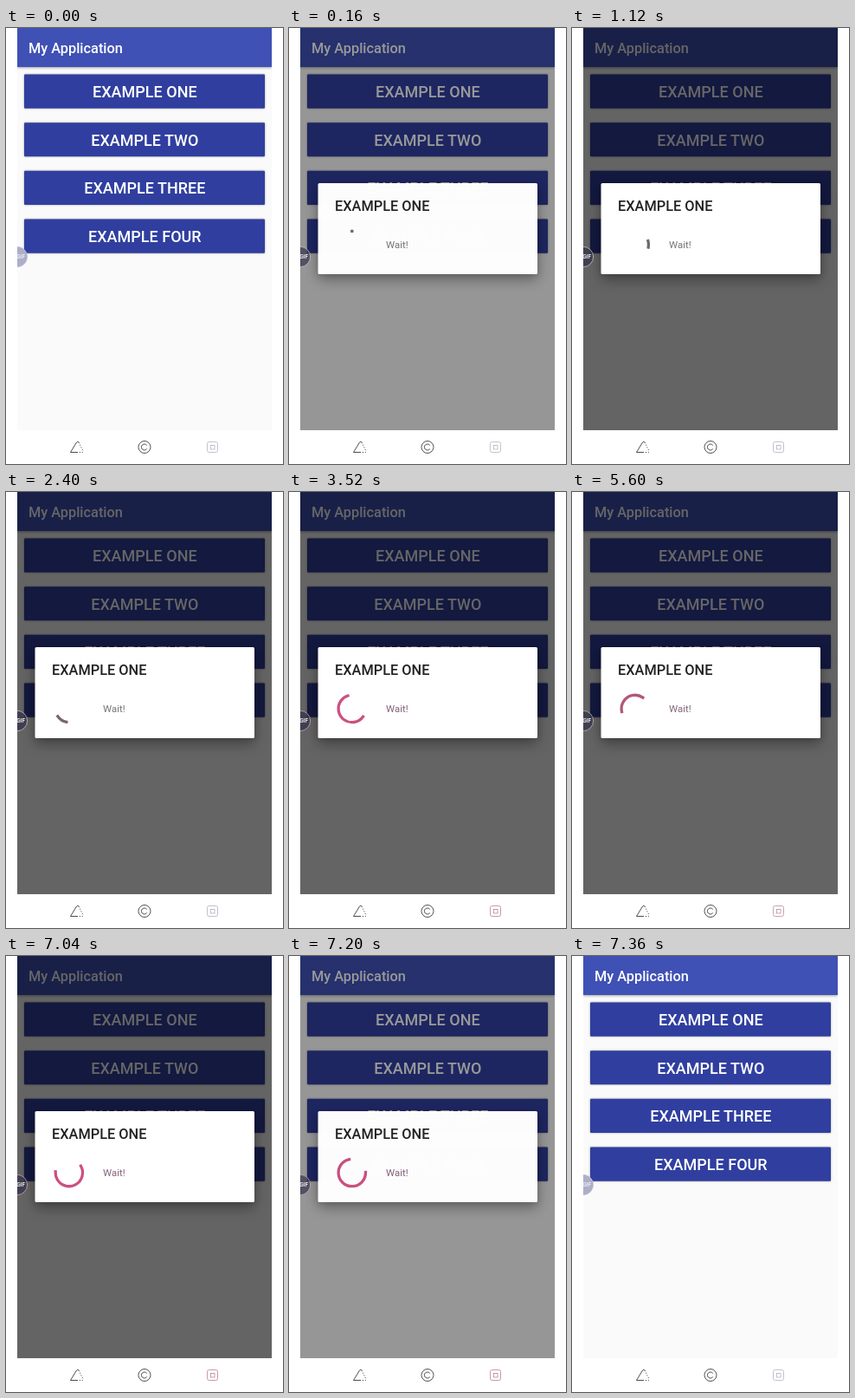
These frames come from a looping animation (320 by 503 pixels, 9.6 s). An HTML page:

```html
<!DOCTYPE html>
<html lang="en">
<head>
<meta charset="utf-8">
<title>Progress dialog</title>
<style>
  html, body { margin: 0; width: 100%; height: 100%; overflow: hidden; background: #fff; }
  svg { display: block; width: 100%; height: 100%; font-family: Roboto, sans-serif; --tint: 0%; }
  .medium { font-weight: 500; }
  .bar { fill: #3f51b5; filter: drop-shadow(0 1px 1.5px rgba(0,0,0,.35)); }
  .button rect { fill: #303f9f; filter: drop-shadow(0 .8px .9px rgba(0,0,0,.38)); }
  .button text { fill: #fff; font-size: 18px; text-anchor: middle; }
  .heading { font-size: 16.33px; }
  .card { fill: #fff; filter: drop-shadow(0 6px 8px rgba(0,0,0,.32)) drop-shadow(0 1px 3px rgba(0,0,0,.15)); }
  .wait { font-size: 11.43px; fill: color-mix(in srgb, #86607a var(--tint), #757575); }
  .spinner { fill: none; stroke-width: 3.3; stroke-linecap: square;
    stroke: color-mix(in srgb, #cc5080 var(--tint), #6a6a6a); }
  .bubble circle { fill: #adaec8; stroke: #c3c4d8; stroke-width: .8; }
  .bubble text { fill: #f4f4fa; font-size: 6.5px; font-weight: 500; }
  .open .bubble circle { fill: rgba(45,45,70,.65); stroke: color-mix(in srgb, #d3a5b5 var(--tint), #c6c6c6); }
  .open .bubble text { fill: #fff; }
  .nav { fill: none; stroke: #222; stroke-width: .8; }
  .nav .recent { stroke: color-mix(in srgb, #bd7f96 var(--tint), #b4b4c4); }
</style>
</head>
<body>
<svg id="stage" viewBox="0 0 320 503">
  <clipPath id="screen"><rect x="13" width="294" height="464"/></clipPath>
  <g clip-path="url(#screen)">
    <rect x="13" width="294" height="464" fill="#fafafa"/>
    <rect class="bar" x="13" y="-5" width="294" height="50"/>
    <text class="heading medium" x="26" y="28.6" fill="#fff">My Application</text>
    <g id="buttons"></g>
    <rect id="dim" x="13" width="294" height="464" opacity="0"/>
    <g id="dialog">
      <rect class="card" x="33.5" y="179" width="253.5" height="105" rx="1.6"/>
      <text class="heading medium" x="53" y="211" fill="#212121">EXAMPLE ONE</text>
      <circle id="spinner" class="spinner" cx="72.8" cy="250" r="15.7" pathLength="360"/>
      <text class="wait" x="112" y="254.4">Wait!</text>
    </g>
    <g class="bubble">
      <circle cx="12.9" cy="264" r="11.7"/>
      <text x="12.2" y="266.3">GIF</text>
    </g>
  </g>
  <g class="nav">
    <path d="M83 489.5H74.5L81.5 478Q83 476.3 84 478"/>
    <path d="M84 478L88.5 487V489.5H83" stroke-dasharray="1.2 1.8"/>
    <circle cx="160" cy="483.5" r="7"/>
    <path d="M162.8 481.5A3.5 3.5 0 1 0 162.8 485.5"/>
    <g class="recent">
      <rect x="232.5" y="477.5" width="12" height="12" rx="2"/>
      <rect x="236.5" y="481.5" width="4.5" height="4.5"/>
    </g>
  </g>
</svg>
<script>
  const LOOP = 9600, STEP = 160, OPEN = 160, CLOSE = 7360, FADE = 240;
  const CYCLE = 1333, TURN = 3332.5, LEAD = 32;
  const byId = id => document.getElementById(id);
  const clamp = x => Math.min(1, Math.max(0, x));
  const stage = byId('stage'), dim = byId('dim'), dialog = byId('dialog'), spinner = byId('spinner');

  byId('buttons').innerHTML = ['ONE', 'TWO', 'THREE', 'FOUR'].map((name, i) => `
    <g class="button" transform="translate(0 ${i * 55.65})">
      <rect x="21" y="53.5" width="278" height="39.2" rx="1"/>
      <text class="medium" x="160.3" y="80.2">EXAMPLE ${name}</text>
    </g>`).join('');

  const cubic = (a, b, c, d, u) => {
    const v = 1 - u;
    return a * v * v * v + 3 * b * v * v * u + 3 * c * v * u * u + d * u * u * u;
  };

  // Eases 0..1 along a Bezier whose x control values are given; y runs 0, 0, 1, 1.
  function ease(p, x0, x1, x2, x3) {
    if (p <= x0) return 0;
    if (p >= x3) return 1;
    let lo = 0, hi = 1;
    for (let i = 0; i < 24; i++) {
      const mid = (lo + hi) / 2;
      if (cubic(x0, x1, x2, x3, mid) < p) lo = mid; else hi = mid;
    }
    return cubic(0, 0, 1, 1, lo);
  }

  function arcAt(time) {
    const p = time % CYCLE / CYCLE;
    const tail = 270 * ease(p, .5, .7, .6, 1);
    const head = 270 * ease(p, 0, .2, .1, .5);
    return { start: tail + 90 * p + 360 * time / TURN, length: Math.max(head - tail, .1) };
  }

  function draw(time) {
    const t = Math.floor(time % LOOP / STEP) * STEP;
    const open = t >= OPEN && t < CLOSE;
    const shown = clamp(Math.min(t, CLOSE - t) / FADE);
    stage.classList.toggle('open', open);
    dialog.setAttribute('opacity', 1 - (1 - shown) ** 4);
    dim.setAttribute('opacity', .6 * shown);

    // The spinner starts turning once its first picture has been shown.
    const { start, length } = arcAt(open && t > OPEN ? t - LEAD : 0);
    spinner.setAttribute('transform', `rotate(${start - 90} 72.8 250)`);
    spinner.setAttribute('stroke-dasharray', `${length} 360`);
    stage.style.setProperty('--tint', `${100 * clamp((length - 20) / 160)}%`);
  }

  const begin = performance.now();
  function tick() {
    draw(performance.now() - begin);
    requestAnimationFrame(tick);
  }
  tick();
</script>
</body>
</html>
```
